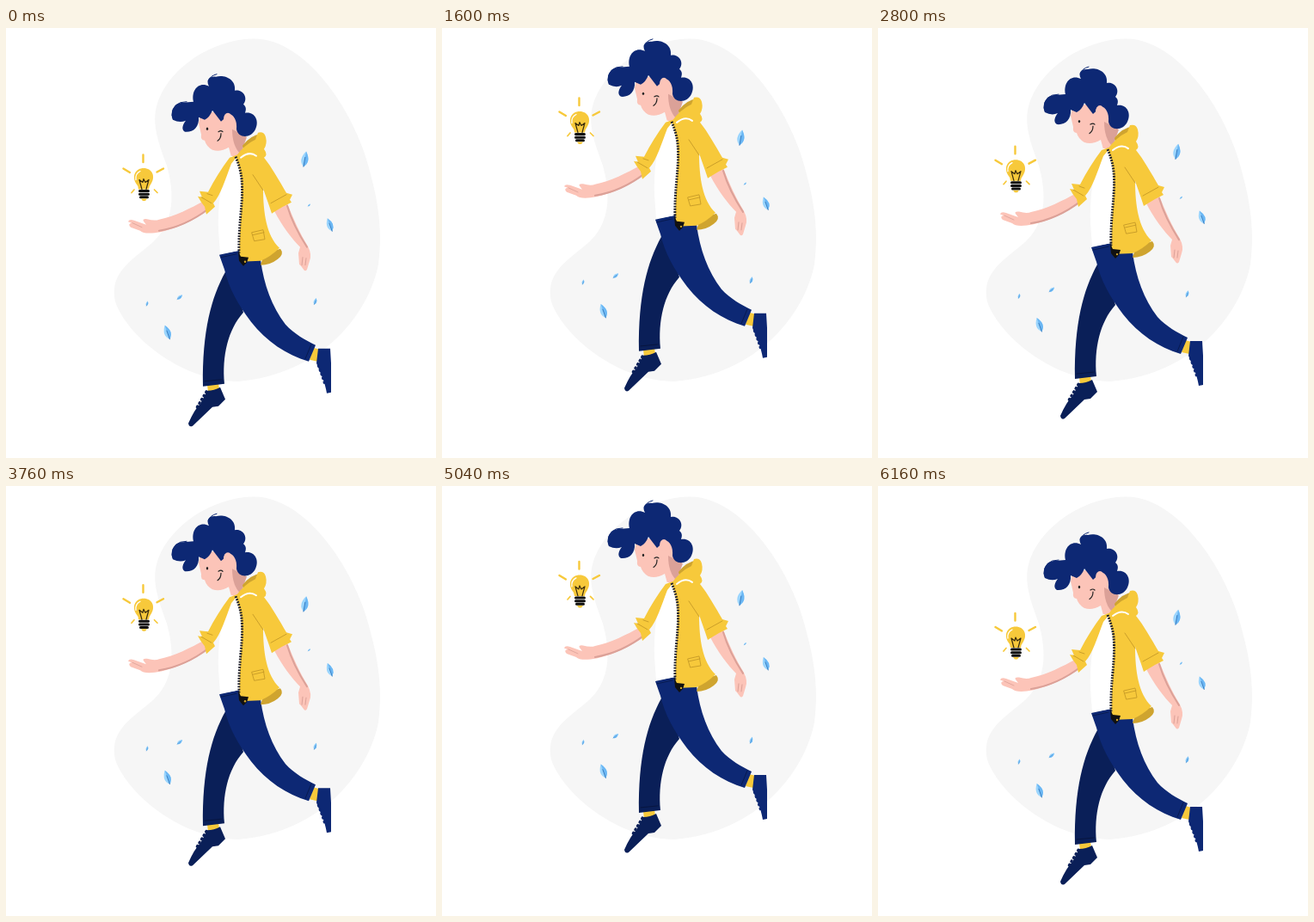
Recreate the animation shown at these times as an HTML page. Size 500x500 px, loop 6240 ms.

```html
<!DOCTYPE html>
<html lang="en">
<head>
<meta charset="utf-8">
<title>Walking with an idea</title>
<style>
  html, body { margin: 0; width: 100%; height: 100%; overflow: hidden; background: #fff; }
  svg { display: block; width: 100vw; height: 100vh; }
  .line { fill: none; stroke-linecap: round; stroke-linejoin: round; }
  .yellow { fill: #f7c93b; }
  .gold { fill: #cfa42f; }
  .skin { fill: #fcc4b8; }
  .shade { fill: #dba198; }
  .navy { fill: #0d2874; }
  .night { fill: #0a1f58; }
</style>
</head>
<body>
<svg viewBox="0 0 500 500">
  <path fill="#f6f6f6" d="M286 12.500C340 10 393 78 416 143C431 190 439 230 433 275C421 335 365 403 270 411C200 410 139 355 127 318C119 283 150 268 172 248C196 225 196 192 187 160C177 132 167 108 178 82C194 44 240 14 286 12.500Z"/>

  <g id="leaves"></g>

  <g id="person">
    <!-- back leg -->
    <path class="yellow" d="M234 415L247 413L248 421L235 424Z"/>
    <path class="night" d="M234 422Q242 422 249 418L255 432L247 440L240 441L217 463Q213 465 212 460Q219 444 226 437Z"/>
    <path class="line" stroke="#0a1f58" stroke-width="3" stroke-dasharray="1 4" d="M233 423L221 443"/>
    <path class="night" d="M255 284C239 313 228 352 229 417L254 414C251 382 258 351 276 331L262 284Z"/>
    <path class="line" stroke="#07153f" d="M231 411L251 409"/>

    <!-- front leg -->
    <path class="yellow" d="M357 372L365 374L362 388L353 386Z"/>
    <path class="navy" d="M363 373H377L378 390V424L373 425Q371 414 368 407L361 390Z"/>
    <path class="line" stroke="#0d2874" stroke-width="2.5" stroke-dasharray="1 4" d="M363 393Q368 406 371 416"/>
    <path class="navy" d="M248 264L271 259L296 270C300 299 309 324 325 345C335 356 348 363 360 369L352 388C326 380 303 365 285 342C270 322 259 303 254 281Z"/>
    <path class="line" stroke="#071a50" d="M355 368L348 385M250 267L268 263"/>

    <!-- far arm -->
    <path class="skin" d="M312 213L327 204C334 222 342 240 351 254Q356 264 353 271L350 281Q348 284 346 281L343 277L341 275L340 262L342 255C333 246 320 229 312 213Z"/>
    <path class="line" stroke="#dba198" stroke-width="2" d="M327 207C332 224 341 241 350 255"/>
    <path class="line" stroke="#dba198" d="M345 267L344 276M349 268L348 276"/>

    <!-- head -->
    <path class="skin" d="M226 99L268 96L274 122L268 130Q270 140 273 149L262 150L259 139Q249 145 240 142Q233 138 231 131Q226 131 227 124L224 111Z"/>
    <path class="shade" d="M263 118L280 127L273 147Q263 138 263 118Z"/>
    <path class="navy" d="M194 107C190 97 196 87 206 87L218 86C215 73 224 62 236 68C232 61 237 56 244 57C254 54 268 60 266 73C276 71 282 82 276 89C280 92 279 96 278 99C289 97 295 108 290 118C285 129 270 129 268 118C269 108 265 101 259 100Q254 106 250 109L240 96Q237 104 231 107L224 104C225 116 217 122 208 121C203 118 206 112 209 108Q202 111 194 107Z"/>
    <path class="line" stroke="#0d2874" d="M193 102Q193 86 210 86M235 62Q237 56 245 54"/>
    <ellipse class="skin" cx="258" cy="106" rx="5" ry="7"/>
    <ellipse cx="234" cy="117.5" rx="1.2" ry="1.7" fill="#222"/>
    <path class="line" stroke="#222" stroke-width="1.2" d="M246 131.500Q250 129 250 123M247 121Q250 119 252 121"/>

    <!-- near arm -->
    <path class="skin" d="M231 201L237 211C218 225 193 236 173 238.500Q160 240 156 236L145 232Q141 228 146 227L142 225.500Q143 222 149 224L163 229L160 225Q158 222 164 222.500Q173 225 178 223C197 219 214 210 231 201Z"/>
    <path class="line" stroke="#dba198" stroke-width="2" d="M236 210C218 224 197 233 178 236"/>
    <path class="line" stroke="#dba198" stroke-width=".8" d="M147 227L158 232"/>

    <!-- clothes -->
    <path fill="#fff" d="M262 149C251 170 246 203 247 235L249 263L272 259L274 190L268 150Z"/>
    <path class="gold" d="M275 137Q284 125 297 123L296 130L277 146Z"/>
    <path class="gold" d="M300 263L319 257Q324 263 316 269Q307 276 296 276Z"/>
    <path class="yellow" d="M268 148L260 151C251 163 242 177 235 191L225 190L228 197L223 196Q226 202 231 208L233 217L243 208L241 204C250 194 255 176 262 158L270 148Z"/>
    <path class="yellow" d="M267 150Q277 136 290 130L293 122Q300 120 302 127Q304 135 300 141Q305 148 300 151C309 162 319 180 326 192L333 194L330 200L332 203Q321 208 312 214L309 216L306 207L299 187C299 215 303 242 318 256Q308 266 296 271L272 272C270 242 275 205 274 185C274 170 270 158 267 150Z"/>
    <path class="line" stroke="#fff" stroke-width="2" d="M273 151Q283 143 291 149"/>
    <path class="line" stroke="#c69a27" stroke-width=".9" d="M287 171L299 189M308 204L326 194M227 197L239 204M286 238L299 235L301 246L289 248ZM287 241L300 238M234 193L240 195"/>
    <path class="line" stroke="#20202a" stroke-width="3" style="stroke-linecap:butt" stroke-dasharray="1.8 1.4" d="M267 150C272 162 274.500 172 274.500 186C275 208 270 232 271 262"/>
    <path d="M270 260L273 266L282 267L280 273L276 277L271 271Z" fill="#111"/>
    <circle class="gold" cx="278" cy="272" r="1.2"/>
  </g>

  <g id="bulb">
    <path class="yellow" d="M154 188Q154 184 151 181C146 172 151 163.500 160 163.500C170 163.500 174 173 169 181Q166 185 166 188Z"/>
    <path class="line" stroke="#fff" stroke-width="1.3" d="M151 177Q150 170 156 167"/>
    <path class="line" stroke="#3a2c0c" stroke-width="1.2" d="M158 188L155 177L159 180L160 176L162 180L166 177L163 188"/>
    <path class="line" stroke="#111" stroke-width="3" d="M155.5 190H165.500M155.500 193.700H165.500M156.500 197.200H164.500"/>
    <path class="yellow" d="M157 199H164L162 201.500H159Z"/>
    <path class="line" stroke="#f7c93b" stroke-width="2.4" d="M159.500 148V156.500M136.500 164L144 168.500M183 164L175.500 168"/>
    <path class="line" stroke="#f7c93b" stroke-width="1.7" d="M146 192L149 188.500M172.500 188.500L176 192"/>
  </g>
</svg>
<script>
const LOOP = 6240, HALF = LOOP / 2, STEP = 80;
const byId = id => document.getElementById(id);
const smooth = x => (1 - Math.cos(Math.PI * Math.min(1, Math.max(0, x)))) / 2;

// x, y, length, tilt
const leaves = [
  [347.5, 152.500, 18, 10], [376.5, 229, 16, -20], [187.5, 354, 17, -20],
  [202, 313, 8, 50], [359.5, 318, 8, 18], [164, 320.5, 6, 15], [352.5, 206, 4, 45]
];
byId("leaves").innerHTML = leaves.map(([x, y, size, tilt]) =>
  `<g transform="translate(${x} ${y}) rotate(${tilt}) scale(${size / 18})">
    <path fill="#9bd5fd" d="M0 -9Q-8 2 0 9Q8 2 0 -9Z"/>
    <path fill="#6bb7f4" d="M0 -9Q8 2 0 9Z"/>
    <path class="line" stroke="#2b6db3" stroke-width=".8" d="M0 -2V9"/>
  </g>`).join("");

const move = (id, y) => byId(id).setAttribute("transform", `translate(0 ${y.toFixed(2)})`);

function draw(now) {
  const t = Math.floor(now / STEP) * STEP % LOOP;
  let u = (t + STEP) % LOOP;
  if (u > HALF) u = LOOP - u;       // the second half mirrors the first
  const lift = u < 1480 ? smooth(u / 1440) : 1 - smooth((u - 1520) / 1600);
  // the middle dip stays a little higher than the one at the loop's end
  const rise = (top, dip) => -(u < 1480 ? top * lift : dip + (top - dip) * lift);
  const body = rise(42, 7);
  move("person", body);
  move("bulb", body - 26 * lift);
  move("leaves", rise(25.5, 8));
}

function tick(now) {
  draw(now);
  requestAnimationFrame(tick);
}
draw(0);
requestAnimationFrame(tick);
</script>
</body>
</html>
```
